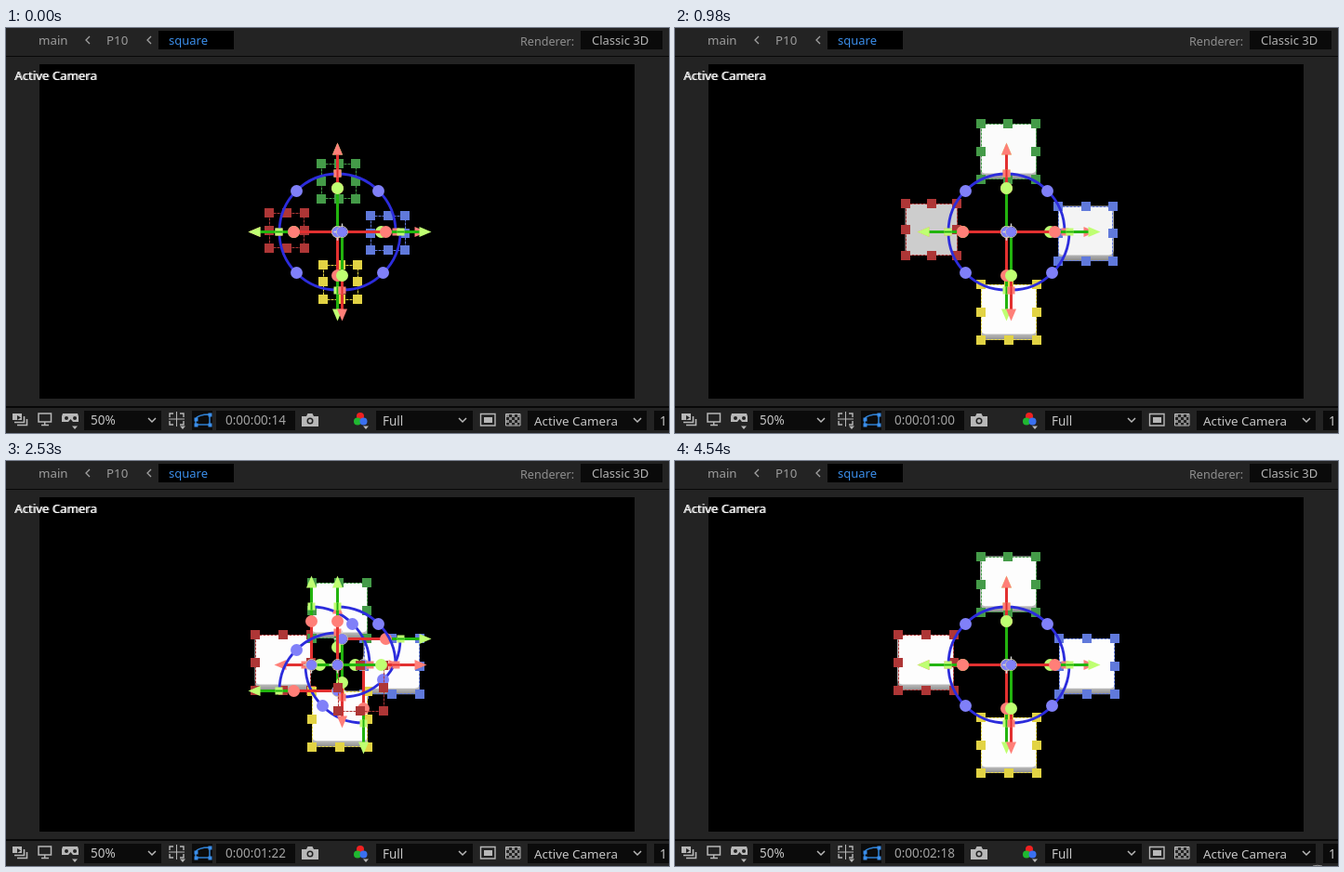
Write an HTML page with a canvas that moves like this. It is 713x436 px and loops after 4610 ms.

```html
<!DOCTYPE html>
<html lang="en">
<head>
<meta charset="utf-8">
<style>
  html, body { margin: 0; width: 100%; height: 100%; overflow: hidden; background: #232323; }
  canvas { display: block; }
</style>
</head>
<body>
<canvas id="stage" width="713" height="436"></canvas>
<script>
const g = document.getElementById('stage').getContext('2d');
const LOOP = 4610, TAU = Math.PI * 2;
const FONT = '"Noto Sans", sans-serif';
const RED = { line: '#e23030', tip: '#ff7f78' }, GREEN = { line: '#22b40e', tip: '#bfff72' };
const LABEL_RED = '#ae3636';

// Squares: start and end centre, inward direction, gizmo origin and quarter turns, entry delay.
const squares = [
  { color: LABEL_RED, from: [302, 218], to: [269.5, 217], dir: [1, 0], origin: [356, 219], turn: 2, delay: 540 },
  { color: '#6079db', from: [410.5, 220.5], to: [443, 221.3], dir: [-1, 0], origin: [356, 219], turn: 0, delay: 280 },
  { color: '#449b48', from: [357.7, 165], to: [358.5, 132.8], dir: [0, 1], origin: [356, 219], turn: -1, delay: 140 },
  { color: '#e2d344', from: [359.5, 273.3], to: [359, 306], dir: [0, -1], origin: [361, 219], turn: 1, delay: 0 }
];

// The picture holds between uneven redraws.
const holds = [...Array(15).fill(70), 60, ...Array(6).fill(70), 200, 260, 130, 70, 130, 70, 70, 70,
  130, 70, 130, 70, 70, 70, 70, 70, 130, 70, 70, 200, 260, 220, 180, 200, 70];
const counterKeys = [[0, 14], [560, 22], [980, 30], [1530, 38], [1730, 42], [1990, 46], [2190, 49],
  [3000, 58], [3410, 61], [3480, 62], [3680, 66], [3940, 70], [4160, 74], [4340, 78], [4610, 78]];

const clamp = v => Math.max(0, Math.min(1, v));
const mix = (a, b, k) => a + (b - a) * k;

function heldTime(t) {
  let start = 0;
  for (const h of holds) {
    if (start + h > t) break;
    start += h;
  }
  return start;
}

function counter(t) {
  const i = counterKeys.findIndex(k => k[0] > t);
  const [t0, a] = counterKeys[i - 1], [t1, b] = counterKeys[i];
  const n = Math.floor(mix(a, b, (t - t0) / (t1 - t0)) + 1e-6);
  return `0:00:0${Math.floor(n / 30)}:${String(n % 30).padStart(2, '0')}`;
}

// Bezier ease (.43, 0, 0, 1).
function entryEase(x) {
  let lo = 0, hi = 1;
  for (let i = 0; i < 20; i++) {
    const s = (lo + hi) / 2;
    if (1.29 * (1 - s) ** 2 * s + s ** 3 < x) lo = s; else hi = s;
  }
  return lo * lo * (3 - 2 * lo);
}

function inwardShift(t) {
  const k = t < 2696 ? clamp((t - 1950) / 746) : clamp((3371 - t) / 675);
  return t < 1990 ? 0 : 16 * (1 - Math.cos(Math.PI * k));
}

function rect(x, y, w, h, color) {
  g.fillStyle = color;
  g.fillRect(x, y, w, h);
}
function rounded(x, y, w, h, radii, color) {
  g.fillStyle = color;
  g.beginPath();
  g.roundRect(x, y, w, h, radii);
  g.fill();
}
function dot(x, y, r, color) {
  g.fillStyle = color;
  g.beginPath();
  g.arc(x, y, r, 0, TAU);
  g.fill();
}
function stroke(path, color, width = 1.5) {
  g.strokeStyle = color;
  g.lineWidth = width;
  g.stroke(new Path2D(path));
}
function fill(path, color) {
  g.fillStyle = color;
  g.fill(new Path2D(path));
}
function text(s, x, y, color, size = 13) {
  g.font = `${size}px ${FONT}`;
  g.fillStyle = color;
  g.fillText(s, x, y);
}

function frameBox(x, y, size, color) {
  const left = Math.round(x) + 0.5, top = Math.round(y) + 0.5, side = Math.round(size) - 1;
  g.strokeStyle = color;
  g.lineWidth = 1;
  g.setLineDash([3, 1]);
  g.strokeRect(left, top, side, side);
  g.setLineDash([]);
  for (let i = 0; i < 3; i++)
    for (let j = 0; j < 3; j++)
      if (i !== 1 || j !== 1) rect(Math.round(x + i * size / 2 - 5), Math.round(y + j * size / 2 - 5), 10, 10, color);
}

function drawSquare(sq, t, shift) {
  const p = entryEase(clamp((t - sq.delay) / 980));
  const size = mix(37.5, 60, p);
  const [x, y] = [0, 1].map(i => mix(sq.from[i], sq.to[i], p) + sq.dir[i] * shift - size / 2);
  const lip = 6.5 * clamp((p - 0.84) / 0.1);
  const grey = v => `rgb(${v * p} ${v * p} ${v * p})`; // fade over black
  const shade = g.createLinearGradient(0, y + size - 9, 0, y + size);
  shade.addColorStop(0, grey(204));
  shade.addColorStop(1, grey(142));
  rounded(x, y, size, size, 3, shade);
  rounded(x, y, size, size - lip, [2, 2, 5, 5], grey(253));
  frameBox(x, y, size, sq.color);
}

function axis(main, other) {
  rect(0, -1.5, 85, 3, main.line);
  rect(0, -1.5, 47, 3, other.line);
  rect(59, -4, 8, 8, main.tip);
  rect(59, -1, 8, 2, main.line);
  fill('M83-5.5L96 0L83 5.5Z', main.tip);
  dot(47, 0, 6.5, other.tip);
}

function gizmo(x, y, turn) {
  g.save();
  g.translate(Math.round(x) + 0.5, Math.round(y) + 0.5);
  g.rotate(turn * Math.PI / 2);
  stroke('M62.5 0A62.5 62.5 0 0 0 0-62.5', '#2c2cdc', 2.8);
  dot(44, -44, 6.5, '#8080f8');
  stroke('M-9 0H9M0-9V9', '#d8d8d8', 1.4);
  axis(RED, GREEN);
  g.save();
  g.rotate(-Math.PI / 2);
  axis(GREEN, RED);
  g.restore();
  stroke('M-6 0A6 6 0 1 0 6 0A6 6 0 1 0-6 0', '#c9c3a8', 1);
  dot(0, 0, 5.6, '#8080f8');
  g.restore();
}

function drawHeader() {
  rect(0, 0, 713, 436, '#232323');
  rect(0, 30, 713, 1, '#080808');
  rect(164, 3, 81, 20, '#000');
  rect(618, 3, 88, 20, '#0a0a0a');
  text('main', 35, 18, '#9c9c9c', 13.3);
  text('P10', 108, 18, '#9c9c9c', 13.3);
  text('square', 175, 18, '#3b8eea');
  text('Renderer:', 553, 19, '#8f8f8f', 12.6);
  text('Classic 3D', 630, 18, '#b4b4b4');
  stroke('M90 9L86 13L90 17M156 9L152 13L156 17', '#a0a0a0', 1.3);
  rect(36, 39, 640, 360, '#000');
}

function drawToolbar(t) {
  const icon = '#b8b8b8', label = '#c6c6c6';
  rect(0, 407, 713, 2, '#080808');
  for (const [x, w] of [[84, 83], [200, 22], [226, 85], [398, 104], [561, 128], [697, 16]])
    rect(x, 412, w, 21, '#0b0b0b');
  text('50%', 91, 427, label, 13.5);
  text('Full', 405, 428, label, 13.5);
  text('Active Camera', 568, 428, label, 13.4);
  text('1', 703, 428, label, 13.5);
  text(counter(t), 236, 427, '#a2a2a2', 13.5);
  for (const x of [157, 491, 679]) stroke(`M${x - 4} 420l4 4l4-4`, icon, 1.5);

  // Layer stack, monitor, goggles
  rect(7, 415, 10, 7, icon);
  stroke('M9 424.5H19.5V418M12 427.5H22.5V421', icon, 1.6);
  fill('M12 417l4 2.5l-4 2.5Z', '#232323');
  stroke('M35 415H48.5V424H35ZM41.7 424V427M38 427.5H46', icon);
  fill('M61 415H77L78 418V424H72L69.5 421L67 424H60V418Z', icon);
  dot(65, 420, 2, '#232323');
  dot(74, 420, 2, '#232323');
  for (const x of [74, 190, 387]) fill(`M${x - 3} 428.5h6l-3 3.5Z`, icon);

  // Guides and mask path
  stroke('M176 419V415H180M187 415H191V419M191 423V427H187M180 427H176V423', icon, 1.4);
  stroke('M183.5 413V429M175 421H192', icon, 1);
  stroke('M204 427V421Q206 416 219 416V427Z', '#2f7fd0', 1.6);
  for (const [x, y] of [[204, 427], [204, 421], [219, 416], [219, 427]]) rect(x - 1.5, y - 1.5, 4, 4, '#3b8eea');

  // Snapshot and channels
  fill('M318 418H323L324.5 415H329.5L331 418H336V429H318Z', icon);
  dot(327, 423, 3.5, '#232323');
  dot(327, 423, 2, icon);
  dot(381, 418, 4, '#f02020');
  dot(378, 423.5, 4, '#20b830');
  dot(384.5, 423.5, 4, '#3a70f0');

  // Region and transparency grid
  stroke('M510.5 415.5H526V428H510.5Z', icon, 1.4);
  rect(514, 419, 9, 6, icon);
  stroke('M537.5 415.5H553V428H537.5Z', icon, 1);
  for (let i = 0; i < 5; i++)
    for (let j = 0; j < 4; j++)
      if ((i + j) % 2 === 0) rect(538 + i * 3, 416 + j * 3, 3, 3, '#8a8a8a');

  if (t >= 4540) stroke('M686 436Q691 434.5 696 436', '#999', 1);
}

function draw(t) {
  const shift = inwardShift(t);
  drawHeader();
  for (const sq of squares) drawSquare(sq, t, shift);
  for (const { origin, dir, turn } of squares)
    gizmo(origin[0] + dir[0] * shift, origin[1] + dir[1] * shift, turn);
  if (t >= 1990 && t < 3410) {
    frameBox(356.5, 219.5, 49.5, LABEL_RED);
    gizmo(356, 219, 0);
  }
  text('Active Camera', 10.2, 56, '#aaa', 13.2);
  text('Active Camera', 9, 56, '#fff', 13.2);
  drawToolbar(t);
}

function tick() {
  draw(heldTime(performance.now() % LOOP));
  requestAnimationFrame(tick);
}
tick();
</script>
</body>
</html>
```
